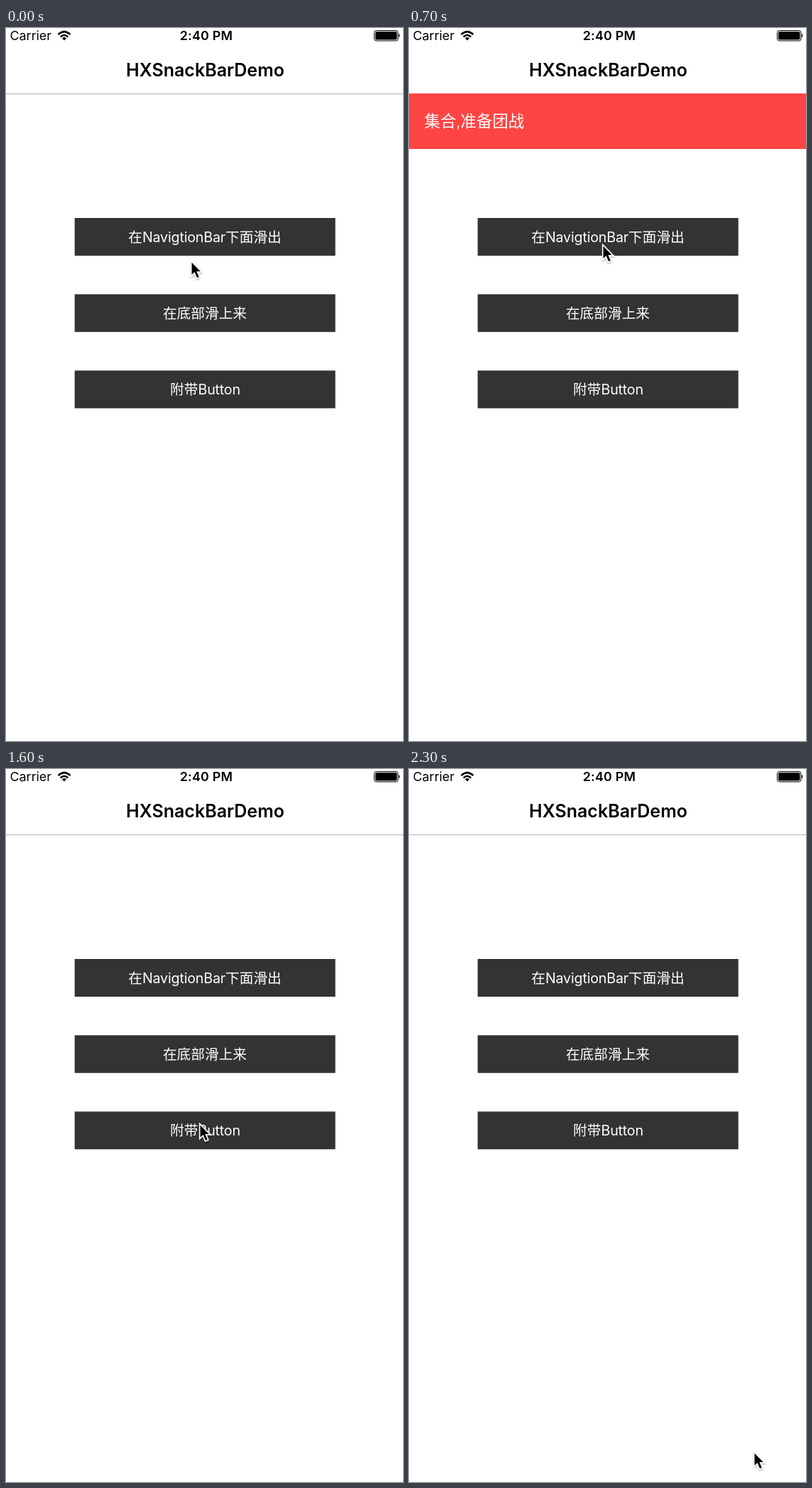
These frames come from a looping animation (559 px wide and 1002 px high, 2.4 s). An HTML page:

```html
<!DOCTYPE html>
<html lang="zh-CN">
<head>
<meta charset="utf-8">
<title>HXSnackBarDemo</title>
<style>
  html, body { margin: 0; width: 100%; height: 100%; overflow: hidden; background: #fff; }
  svg { display: block; width: 559px; height: 1002px; }
  text { font-family: Inter, "Noto Sans CJK SC", "Noto Sans CJK", sans-serif; white-space: pre; }
  .status { font-size: 17.9px; }
  .bold { font-weight: 600; }
  .button rect { fill: #333; }
  .button text { font-size: 19.7px; fill: #fff; text-anchor: middle; }
  .latin { letter-spacing: -.2px; }
  .snack text { font-size: 22.4px; font-weight: 300; fill: #fff; }
  .snack .action { font-weight: 600; text-anchor: end; }
</style>
</head>
<body>
<svg viewBox="0 0 559 1002">
  <defs>
    <linearGradient id="pink" x2="0" y2="1">
      <stop offset="0" stop-color="#ffeaea"/>
      <stop offset=".4" stop-color="#ffd4d4"/>
      <stop offset="1" stop-color="#ffcaca"/>
    </linearGradient>
    <filter id="shadow" x="-50%" y="-50%" width="200%" height="200%">
      <feDropShadow dx="0" dy="1.5" stdDeviation="1.2" flood-opacity=".35"/>
    </filter>
  </defs>

  <path d="M0 92.5H559" stroke="#b2b2b2"/>
  <g class="snack">
    <rect width="559" height="79" fill="#f44"/>
    <text x="21.5" y="48">集合,准备团战</text>
  </g>

  <rect width="559" height="92" fill="#fff"/>
  <rect id="tint" width="559" height="92" fill="url(#pink)"/>
  <text class="status" x="5.5" y="17.3">Carrier</text>
  <text class="status bold" x="282" y="17.3" text-anchor="middle" letter-spacing=".2">2:40 PM</text>
  <text class="bold" x="280.5" y="68" font-size="25" text-anchor="middle">HXSnackBarDemo</text>
  <g fill="none" stroke="#000" stroke-width="2.5">
    <path d="M73.5 9.2Q82 1 90.5 9.2M76.7 12.5Q82 7.6 87.3 12.5"/>
    <path d="M79 14.4Q82 11.8 85 14.4L82 17.5Z" fill="#000" stroke="none"/>
    <rect x="518.5" y="3.5" width="33.5" height="14.5" rx="3" stroke-width="1"/>
    <rect x="520" y="5" width="30.5" height="11.5" rx="1.8" fill="#000" stroke="none"/>
    <path d="M553.2 8Q556 10.7 553.2 13.5Z" fill="#000" stroke="none"/>
  </g>

  <g class="button" transform="translate(96.7 267)">
    <rect width="367" height="53"/>
    <text x="183.3" y="33.5">在<tspan class="latin">NavigtionBar</tspan>下面滑出</text>
  </g>
  <g class="button" transform="translate(96.7 374.2)">
    <rect width="367" height="53"/>
    <text x="183.3" y="33.5">在底部滑上来</text>
  </g>
  <g class="button" transform="translate(96.7 481.4)">
    <rect width="367" height="53"/>
    <text x="183.8" y="33.5">附带<tspan class="latin">Button</tspan></text>
  </g>

  <g class="snack">
    <rect width="559" height="79" fill="#069bd1"/>
    <text x="21.5" y="48">进攻暗影主宰</text>
  </g>
  <g class="snack">
    <rect width="559" height="79" fill="#f44"/>
    <text x="21.5" y="48">网络好像有点不稳定</text>
    <text class="action" x="539" y="48">重新尝试</text>
  </g>

  <g id="cursor" filter="url(#shadow)">
    <path d="M1.5 3.5V20.8L5.5 17L9 25L11.8 23.8L8.4 15.9H13.8Z" stroke="#fff" stroke-width="3.2" paint-order="stroke"/>
  </g>
</svg>
<script>
const LOOP = 2400, STEP = 100, TRAVEL = 78.5;
const bars = document.querySelectorAll(".snack");
const labels = document.querySelectorAll(".button text");
const tint = document.getElementById("tint");
const cursor = document.getElementById("cursor");

// Each tap on a button slides its bar from one edge; the bar is cut at the end time.
const snacks = [
  { tap: 200, end: 800, from: 12.5, dir: 1 },
  { tap: 900, end: 1400, from: 1002, dir: -1 },
  { tap: 1700, end: 2300, from: 1002, dir: -1 },
];

// Places where the cursor rests, with arrival and departure times.
const stops = [
  { arrive: 0, leave: 0, x: 260, y: 326 },
  { arrive: 200, leave: 200, x: 270, y: 293 },
  { arrive: 400, leave: 700, x: 272, y: 303 },
  { arrive: 900, leave: 1200, x: 268.5, y: 391.5 },
  { arrive: 1600, leave: 1600, x: 272, y: 497 },
  { arrive: 1800, leave: 1800, x: 272, y: 511 },
  { arrive: 2200, leave: LOOP, x: 485, y: 958 },
];

const clamp = u => Math.min(1, Math.max(0, u));
const smooth = u => u * u * (3 - 2 * u);
const slide = age => 1 / (1 + Math.exp(-.066 * (age - 40)));
const move = (node, x, y) => node.setAttribute("transform", `translate(${x} ${y})`);

function drawCursor(t) {
  const i = stops.findLastIndex(s => s.arrive <= t);
  const a = stops[i], b = stops[i + 1] || a;
  const u = b === a ? 0 : smooth(clamp((t - a.leave) / (b.arrive - a.leave)));
  move(cursor, a.x + (b.x - a.x) * u, a.y + (b.y - a.y) * u);
}

function draw(now) {
  const t = Math.floor(now % LOOP / STEP) * STEP;
  snacks.forEach(({ tap, end, from, dir }, i) => {
    const age = t - tap, active = age >= 0 && t < end;
    bars[i].setAttribute("visibility", active ? "visible" : "hidden");
    move(bars[i], 0, from + dir * TRAVEL * slide(age));
    labels[i].setAttribute("opacity", age < 0 ? 1 : clamp(.28 + age / 200));
    if (i === 0) tint.setAttribute("opacity", active ? 1 - slide(age) : 0);
  });
  drawCursor(t);
}

const start = performance.now();
function frame() {
  draw(performance.now() - start);
  requestAnimationFrame(frame);
}
frame();
</script>
</body>
</html>
```
